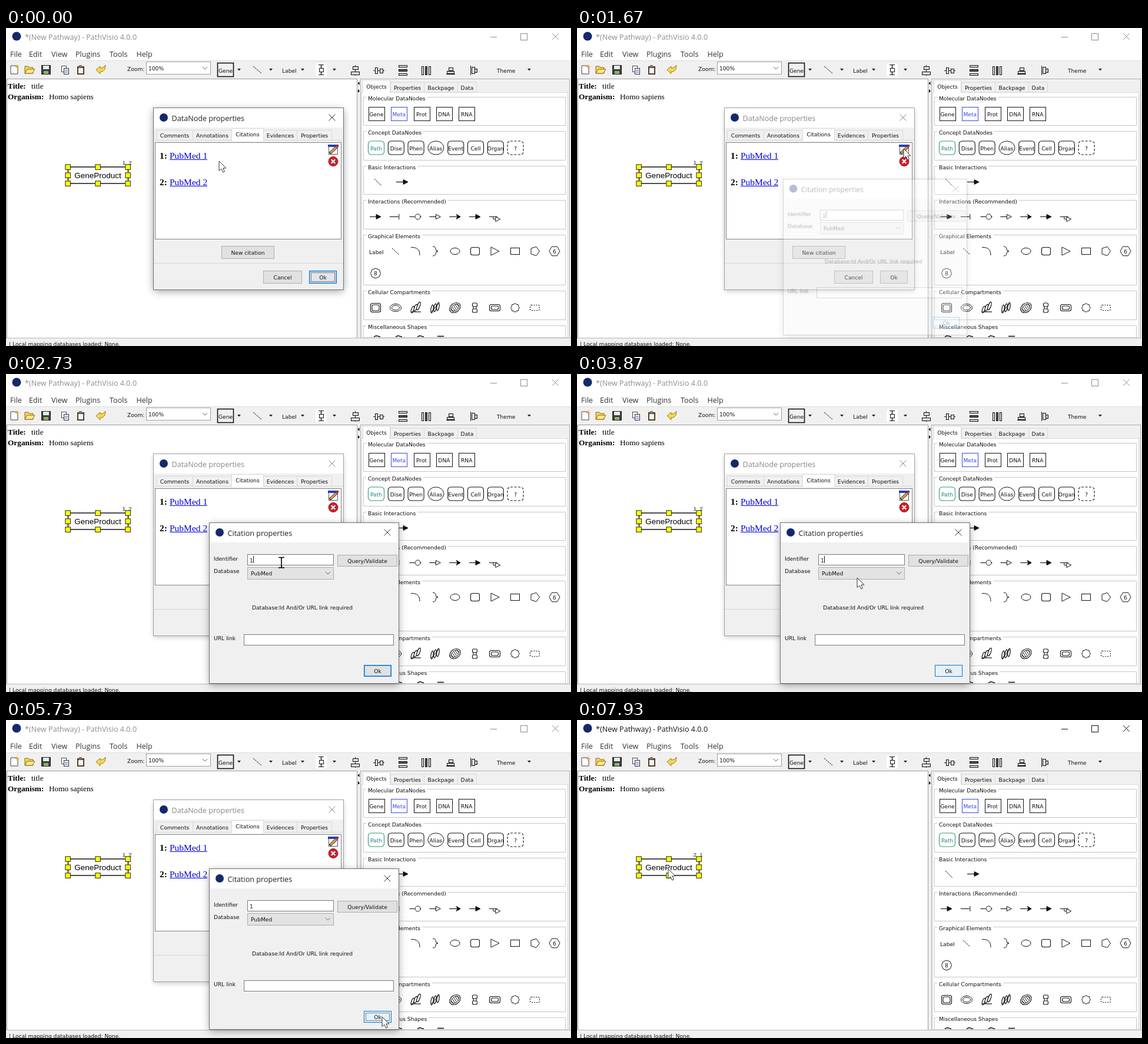
An HTML page with a canvas that plays this animation: 960x540 px, repeating every 8000 ms.

```html
<!DOCTYPE html>
<html lang="en">
<head>
<meta charset="utf-8">
<title>Citation order</title>
<style>
html, body { margin: 0; width: 100%; height: 100%; overflow: hidden; background: #fff; }
canvas { display: block; width: 100vw; height: 100vh; }
</style>
</head>
<body>
<canvas id="stage" width="960" height="540"></canvas>
<script>
const stage = document.getElementById('stage').getContext('2d');
const layer = document.createElement('canvas');
layer.width = 960;
layer.height = 540;
const layerCtx = layer.getContext('2d');
let c = stage;

const LOOP = 8000;
const UI = '9.15px "DejaVu Sans", sans-serif';
const WIN = '12.6px "Open Sans", sans-serif';
const SERIF = '"Liberation Serif", serif';
const GREY = '#f0f0f0', INK = '#111', BLUE = '#0078d7';
const TAU = Math.PI * 2;

// Moments at which the windows change
const CITE_OPEN = 1610, CITE_CLOSE = 5840, PROPS_CLOSE = 6760;

// Pointer stops: time, x, y
const PATH = [
  [0, 362, 226], [350, 362, 226], [1150, 555, 205], [1800, 555, 205],
  [2480, 468, 320], [3130, 468, 320], [3700, 476, 346], [4420, 476, 346],
  [5180, 639, 504], [5860, 639, 504], [6420, 542, 423], [6960, 542, 423],
  [7740, 155, 253], [LOOP, 155, 253]
];

function text(s, x, y, font = UI, color = INK, align = 'left') {
  c.font = font;
  c.fillStyle = color;
  c.textAlign = align;
  c.fillText(s, x, y);
}

function fill(x, y, w, h, color) {
  c.fillStyle = color;
  c.fillRect(x, y, w, h);
}

function box(x, y, w, h, bg, edge = INK, lw = 1) {
  if (bg) fill(x, y, w, h, bg);
  c.strokeStyle = edge;
  c.lineWidth = lw;
  c.strokeRect(x + .5, y + .5, w, h);
}

function trace(pts) {
  c.beginPath();
  for (let i = 0; i < pts.length; i += 2) c.lineTo(pts[i], pts[i + 1]);
}

function paint(bg, edge = INK, lw = 1) {
  if (bg) { c.fillStyle = bg; c.fill(); }
  if (edge) { c.strokeStyle = edge; c.lineWidth = lw; c.stroke(); }
}

function line(pts, color = INK, lw = 1, dash = []) {
  trace(pts);
  c.setLineDash(dash);
  paint(null, color, lw);
  c.setLineDash([]);
}

function poly(pts, bg, edge = INK, lw = 1) {
  trace(pts);
  c.closePath();
  paint(bg, edge, lw);
}

function oval(x, y, rx, ry, bg, edge = INK, lw = 1, turn = 0) {
  c.beginPath();
  c.ellipse(x, y, rx, ry, turn, 0, TAU);
  paint(bg, edge, lw);
}

function round(x, y, w, h, r, bg, edge = INK, lw = 1.1) {
  c.beginPath();
  c.roundRect(x, y, w, h, r);
  paint(bg, edge, lw);
}

function ngon(x, y, r, n, turn = 0, wobble = 0) {
  const pts = [];
  for (let i = 0; i < n; i++) {
    const a = turn + i * TAU / n, d = r - wobble * (i % 2);
    pts.push(x + d * Math.cos(a), y + d * Math.sin(a));
  }
  poly(pts, null);
}

function dotted(x, y, w, h) {
  c.setLineDash([1, 1]);
  box(x, y, w, h, null);
  c.setLineDash([]);
}

function cross(x, y, r, color, lw = 1) {
  line([x - r, y - r, x + r, y + r], color, lw);
  line([x + r, y - r, x - r, y + r], color, lw);
}

function button(label, x, y, w, h, edge = '#adadad', bg = '#e1e1e1') {
  box(x, y, w, h, bg, edge);
  text(label, x + w / 2 + .5, y + h / 2 + 4, UI, INK, 'center');
}

// The default button breathes between grey and pale blue
function okButton(x, y, w, h, t, hot, focus) {
  const p = hot ? 1 : .5 - .5 * Math.cos((t - 2730) / 2280 * TAU);
  const mix = (a, b) => Math.round(a + (b - a) * p);
  button('Ok', x, y, w, h, BLUE, `rgb(${mix(225, 229)},${mix(225, 241)},${mix(225, 251)})`);
  if (!hot) box(x + 1, y + 1, w - 2, h - 2, null, `rgba(0,120,215,${.6 * (1 - p)})`);
  if (focus) dotted(x + 3, y + 3, w - 6, h - 6);
}

function chevron(x, y) {
  line([x - 4, y - 2, x, y + 2, x + 4, y - 2], '#666');
}

function drop(x) {
  poly([x - 3, 69, x + 3, 69, x, 72.5], '#222', null);
}

function head(x, y, bg, open) {
  if (open) poly([x - 7, y - 4, x, y, x - 7, y + 4, x - 5, y], bg);
  else poly([x - 8, y - 4, x, y, x - 8, y + 4], bg);
}

function toolbar() {
  fill(0, 56, 960, 31, GREY);
  line([0, 55.5, 960, 55.5], '#dcdcdc');
  // new, open, save
  poly([8, 64, 17, 64, 20, 67, 20, 78, 8, 78], '#fff', '#444');
  line([19, 62, 19, 69], '#d9a520', 1.4); line([15.5, 65.5, 22.5, 65.5], '#d9a520', 1.4);
  poly([32, 77, 32, 65, 38, 65, 40, 67, 46, 67, 46, 77], '#f4d35e', '#8a6a10');
  poly([32, 77, 36, 70, 49, 70, 45, 77], '#ffe78a', '#8a6a10');
  box(60, 63, 15, 15, '#3b3f3a', '#222');
  fill(63, 64, 10, 6, '#e8eef0'); fill(64, 73, 8, 5, '#8fb06b');
  // copy, paste, undo
  box(94, 64, 8, 10, '#fff', '#445'); box(98, 68, 8, 10, '#e9effa', '#334');
  line([100, 72, 105, 72], '#668'); line([100, 75, 105, 75], '#668');
  box(121, 65, 11, 13, '#6b4a35', '#332'); fill(123, 68, 8, 9, '#f3f3f3'); fill(124, 63, 5, 4, '#777');
  poly([153, 71, 160, 65, 160, 68, 165, 67, 169, 63, 168, 70, 164, 74, 160, 74, 160, 78], '#f7d84b', '#9b7a16');
  text('Zoom:', 206, 73);
  box(238, 57, 109, 21, '#fff', '#a0a0a0');
  text('100%', 242, 72);
  chevron(338, 68);
  box(359, 59, 27, 23, GREY, '#111', 1.6);
  text('Gene', 373, 75.5, UI, INK, 'center');
  [396, 450, 504, 558, 889].forEach(drop);
  line([420, 65, 434, 77], INK, 1, [3, 1]);
  text('Label', 469, 75.5);
  fill(526, 60, 19, 22, '#fff');
  line([531, 62.5, 540, 62.5]); line([531, 79.5, 540, 79.5]); line([535.5, 62, 535.5, 80], INK, 1.4);
  box(532, 68, 7, 6, '#fff');
  // alignment tools
  line([593.5, 63, 593.5, 81]); box(589, 65, 9, 5, '#ddd'); box(586, 74, 14, 5, '#ddd');
  line([624, 72.5, 643, 72.5]); box(627, 67, 4, 10, '#ddd'); box(635, 69, 5, 7, '#ddd');
  for (let i = 0; i < 3; i++) {
    box(667, 63 + i * 7, 14, 3, i == 1 ? '#555' : '#ddd');
    box(706 + i * 6, 65, 3, 14, i == 1 ? '#555' : '#ddd');
  }
  line([748, 78.5, 763, 78.5]); box(752, 67, 7, 5, '#ddd'); box(749, 73, 12, 4, '#ccc');
  line([789.5, 64, 789.5, 80]); box(791, 66, 5, 11, '#ddd'); box(796, 69, 4, 6, '#ccc');
  text('Theme', 834, 75.5);
}

function group(label, top, bottom) {
  line([612, top + .5, 607.5, top + .5, 607.5, bottom + .5, 950.5, bottom + .5, 950.5, top + .5, 614, top + .5], '#c6c6c6');
  c.font = UI;
  fill(613, top - 3, c.measureText(label).width + 5, 10, '#fff');
  text(label, 615, top + 6);
}

function palette() {
  ['Gene', 'Meta', 'Prot', 'DNA', 'RNA'].forEach((s, i) => {
    const x = 616 + i * 38.3, color = i == 1 ? '#3947dd' : INK;
    box(Math.round(x), 134, 27, 23, '#fff', color);
    text(s, x + 13.5, 150, UI, color, 'center');
  });
  ['Path', 'Dise', 'Phen', 'Alias', 'Event', 'Cell', 'Organ', '?'].forEach((s, i) => {
    const x = 629 + i * 33.8, color = i ? INK : '#2f9a70';
    if (i == 3) oval(x, 203.5, 13.5, 11.5, '#fff');
    else {
      if (i == 7) c.setLineDash([4, 2.5]);
      round(x - 13.5, 192, 27, 23, 5, '#fff', color);
      c.setLineDash([]);
    }
    text(s, x, 208, UI, i ? INK : '#247f83', 'center');
  });
  line([626, 256, 638, 268], INK, 1, [3, 1]);
  line([663, 261.5, 676, 261.5], INK, 1.2); head(683, 261.5, INK);

  const mid = i => 628 + i * 33.8;
  for (let i = 0; i < 6; i++) line([mid(i) - 10, 320.5, mid(i) + (i == 2 ? -1 : 5), 320.5], INK, 1.1);
  head(mid(0) + 9, 320.5, INK);
  line([mid(1) + 6, 316, mid(1) + 6, 325]);
  oval(mid(2) + 4, 320.5, 4.5, 4.5, '#fff'); line([mid(2) + 8, 320.5, mid(2) + 10, 320.5]);
  head(mid(3) + 9, 320.5, '#fff');
  head(mid(4) + 9, 320.5, INK, true);
  head(mid(5) + 9, 320.5, INK);
  line([mid(6) - 10, 320.5, mid(6) + 4, 320.5]); line([mid(6) - 3, 320, mid(6) - 3, 324.5, mid(6) + 2, 324.5]);
  head(mid(6) + 9, 324.5, '#fff');

  const y = 379;
  text('Label', 617, 383.5);
  line([656, 374, 668, 385], INK, 1, [3, 1]);
  c.beginPath(); c.moveTo(688, 372.5); c.bezierCurveTo(699, 372, 703, 377, 703, 386); paint(null);
  c.beginPath(); c.moveTo(725, 371); c.quadraticCurveTo(730, 371, 730, 375);
  c.quadraticCurveTo(730, 379, 734, 379); c.quadraticCurveTo(730, 379, 730, 383);
  c.quadraticCurveTo(730, 387, 725, 387); paint(null);
  oval(763, y, 8, 5.5);
  round(789.5, 372.5, 15, 13, 3);
  poly([824, 372, 838, y, 824, 386], null);
  box(857, 373, 15, 11, null);
  ngon(898.5, y, 8, 5);
  ngon(932, y, 9, 6); text('6', 932, 382.5, UI, INK, 'center');
  ngon(628, 416.5, 8.5, 8); text('8', 628, 420, UI, INK, 'center');

  const q = 475;
  round(619.5, 467.5, 17, 15, 3); round(622, 470, 12, 10, 2);
  oval(662, q, 9.5, 6.5); oval(662, q, 6.5, 4);
  for (let i = 0; i < 3; i++) {
    oval(691 + i * 5, 478 - i * 3, 2.2, 6 + (i > 1), '#fff', INK, 1.2, .35);
    oval(724 + i * 5, 477 - i * 2, 2, 7, '#fff', INK, 1.2, .15);
  }
  line([688, 482, 705, 482], INK, 1.2); line([722, 483, 735, 468], INK, 1);
  oval(763, q, 10, 7.5, '#fff', INK, 1.2, -.65); oval(763, q, 7.5, 5, null, INK, 1, -.65);
  for (let i = -2; i < 3; i++) line([761 + i * 2.4, 472 - i * 2, 765 + i * 2.4, 478 - i * 2]);
  round(792.5, 467, 8, 6, 2); round(792.5, 477, 8, 6, 2); line([794, 473, 794, 477]); line([799, 473, 799, 477]);
  round(821.5, 469.5, 18, 11, 3); round(824.5, 472, 12, 6, 2);
  ngon(865, q, 7.5, 16, 0, 1.3);
  c.setLineDash([2, 2]); round(890.5, 470.5, 16, 9, 2); c.setLineDash([]);

  for (let i = 0; i < 3; i++) line([625 + i * 37, 524.5, 629 + i * 37, 522.5, 636 + i * 37, 524.5], INK, 1.4);
  line([733, 523.5, 744, 523.5], INK, 1.6);
}

function tab(label, x, w, y, on) {
  box(x, on ? y - 3 : y, w, on ? 20 : 17, on ? '#fff' : GREY, '#d9d9d9');
  text(label, x + w / 2 + .5, y + (on ? 11 : 13), UI, INK, 'center');
}

function mainWindow(active, order) {
  fill(0, 0, 960, 540, '#fff');
  const tone = active ? '#111' : '#8c8c8c';
  oval(18, 14, 7.5, 7.5, '#14296b', null);
  text('*(New Pathway) - PathVisio 4.0.0', 32, 20, WIN, tone);
  line([823, 15.5, 834, 15.5], tone);
  box(874, 9, 11, 11, null, tone);
  cross(933.5, 14.5, 5.3, tone);
  [['File', 7], ['Edit', 39], ['View', 77], ['Plugins', 118], ['Tools', 176], ['Help', 221.5]]
    .forEach(([s, x]) => text(s, x, 49, WIN, '#333'));
  toolbar();

  box(1, 86, 595, 440, '#fff', '#9a9a9a');
  fill(0, 87, 1, 453, '#d0d0d0');
  const big = '13.3px ' + SERIF;
  text('Title:', 3, 103, 'bold ' + big, '#000');
  text('title', 43, 103, big, '#000');
  text('Organism:', 3, 121, 'bold ' + big, '#000');
  text('Homo sapiens', 73, 121, big, '#000');

  text(order, 213.5, 232, '9.5px "Liberation Sans", sans-serif', '#0c1c50', 'right');
  box(105, 235.5, 102, 28, '#fff', '#000', 1.4);
  text('GeneProduct', 156, 254.5, '13.5px "Liberation Sans", sans-serif', '#000', 'center');
  for (const x of [105, 156, 207]) for (const y of [236, 250, 264])
    if (x != 156 || y != 250) box(x - 4.6, y - 4.6, 8.5, 8.5, '#ff0', '#222');

  fill(597, 87, 363, 453, GREY);
  poly([600.5, 91, 600.5, 97, 597.5, 94], '#000', null);
  poly([598, 104, 598, 110, 601, 107], '#000', null);
  box(602, 86, 355, 440, GREY, '#b0b0b0');
  tab('Properties', 653, 57, 91.5);
  tab('Backpage', 710, 57, 91.5);
  tab('Data', 767, 32, 91.5);
  box(604, 109, 350, 416, '#fff', '#d9d9d9');
  tab('Objects', 606, 46, 91.5, true);
  fill(607, 108, 45, 3, '#fff');
  c.save();
  c.beginPath(); c.rect(603, 88, 353, 437); c.clip();
  group('Molecular DataNodes', 117, 165);
  group('Concept DataNodes', 175, 224);
  group('Basic Interactions', 234, 282);
  group('Interactions (Recommended)', 292, 341);
  group('Graphical Elements', 351, 436);
  group('Cellular Compartments', 446, 495);
  group('Miscellaneous Shapes', 505, 560);
  palette();
  c.restore();

  fill(0, 527, 960, 13, GREY);
  line([0, 526.5, 960, 526.5], '#b8b8b8');
  text('| Local mapping databases loaded: None.', 5, 539.5);
}

function frame(x, y, w, h, title, active) {
  c.save();
  c.shadowColor = `rgba(0,0,0,${active ? .38 : .22})`;
  c.shadowBlur = active ? 13 : 8;
  c.shadowOffsetY = 3;
  fill(x, y, w, h, GREY);
  c.restore();
  box(x - 1, y - 1, w + 1, h + 1, null, active ? '#707070' : '#a0a0a0');
  fill(x, y, w, 33, '#fff');
  oval(x + 17, y + 16, 7, 7, '#14296b', null);
  text(title, x + 30.5, y + 21.5, WIN, active ? '#222' : '#888');
  cross(x + w - 19, y + 16, 5.5, active ? '#333' : '#888');
}

function citation(n, y) {
  const size = '15.5px ' + SERIF;
  text(n + ':', 261, y, 'bold ' + size, '#000');
  text('PubMed ' + n, 278, y, size, '#0000e0');
  line([278, y + 1.5, 342, y + 1.5], '#0000e0');
}

function propsDialog(t, active, swapped, hot) {
  frame(251, 136, 322, 308, 'DataNode properties', active);
  tab('Comments', 255, 62, 173);
  tab('Annotations', 317, 66, 173);
  tab('Evidences', 437, 57, 173);
  tab('Properties', 494, 59, 173);
  line([252, 190.5, 572, 190.5], '#d9d9d9');
  tab('Citations', 383, 54, 173, true);
  fill(384, 189, 53, 3, '#fff');
  if (swapped) dotted(386, 173, 46, 14);
  box(253, 194, 316, 164, '#fff', '#7d838c');
  if (swapped) {
    citation(2, 218);
    citation(1, 258);
  } else {
    citation(1, 222);
    citation(2, 267);
    box(548, 199, 15, 15, '#fff', '#556');
    fill(547, 198, 18, 4, '#2a3fb0');
    line([550, 213, 562, 202], '#333', 4.5);
    line([551, 212, 562, 202], '#e9a23a', 3);
    line([561, 203, 564, 200.5], '#c33', 3);
    oval(556, 226.5, 8, 8, '#cf1f2b', '#9c1720');
    cross(556, 226.5, 3.2, '#fff', 2.2);
  }
  button('New citation', 366, 370, 89, 21);
  line([251, 399.5, 573, 399.5], '#d5d5d5');
  button('Cancel', 437, 412, 65, 21);
  if (active) okButton(515, 412, 46, 21, t, hot, !swapped);
  else button('Ok', 515, 412, 46, 21);
}

function citeDialog(t, hot, caret) {
  frame(346, 253, 321, 272, 'Citation properties', true);
  text('Identifier', 353, 316.5);
  box(410, 306, 146, 18, '#fff', '#7a7a7a');
  text('1', 414, 319.5);
  if (caret) line([420.5, 309, 420.5, 321]);
  button('Query/Validate', 563, 307, 101, 19);
  text('Database', 353, 337.5);
  box(410, 328, 146, 20, '#e3e3e3', '#adadad');
  text('PubMed', 416, 342);
  chevron(547, 338);
  text('Database:Id And/Or URL link required', 418, 400);
  text('URL link', 353, 452);
  box(404, 442, 254, 18, '#fff', '#7a7a7a');
  okButton(608, 494, 46, 19, t, hot, hot);
}

// Windows grow slightly while fading in and shrink while fading out.
// Each is drawn whole on a layer, so that its parts fade as one sheet.
function popup(t, open, close, cx, cy, paintWindow) {
  const k = Math.min(1, (t - open) / 200, 1 - (t - close) / 150);
  if (k <= 0) return;
  if (k == 1) return paintWindow();
  c = layerCtx;
  c.clearRect(0, 0, 960, 540);
  paintWindow();
  c = stage;
  const s = .955 + .045 * k;
  c.save();
  c.globalAlpha = k;
  c.translate(cx, cy);
  c.scale(s, s);
  c.drawImage(layer, -cx, -cy);
  c.restore();
}

function pointer(t) {
  let i = 0;
  while (i < PATH.length - 2 && PATH[i + 1][0] <= t) i++;
  const [t0, x0, y0] = PATH[i], [t1, x1, y1] = PATH[i + 1];
  const k = (t - t0) / (t1 - t0), e = k * k * (3 - 2 * k);
  return [x0 + (x1 - x0) * e, y0 + (y1 - y0) * e];
}

function drawPointer(x, y, beam) {
  if (beam) {
    line([x - 5, y - 8.5, x - 1, y - 8.5, x, y - 7, x + 1, y - 8.5, x + 5, y - 8.5], '#000', 1.4);
    line([x - 5, y + 9, x - 1, y + 9, x, y + 7.5, x + 1, y + 9, x + 5, y + 9], '#000', 1.4);
    line([x, y - 8, x, y + 9], '#000', 1.6);
    return;
  }
  const shape = [0, 0, 0, 16.5, 3.8, 13, 6.6, 19, 9.4, 17.8, 6.8, 12, 12, 12];
  poly(shape.map((v, i) => v + (i % 2 ? y : x)), '#fff', '#333');
}

function draw(t) {
  const [x, y] = pointer(t);
  const inside = (l, top, r, b) => x >= l && x <= r && y >= top && y <= b;
  const citing = t >= CITE_OPEN && t < CITE_CLOSE;
  const swapped = t >= CITE_CLOSE;
  const hot = inside(608, 494, 655, 514);
  const caret = !hot && (t - CITE_OPEN) % 1000 < 520;

  mainWindow(t >= PROPS_CLOSE, swapped ? '2, 1' : '1, 2');
  popup(t, -LOOP, PROPS_CLOSE, 412, 290, () =>
    propsDialog(t, !citing, swapped, inside(515, 412, 562, 434)));
  popup(t, CITE_OPEN, CITE_CLOSE, 506, 389, () => citeDialog(t, hot, caret));
  drawPointer(x, y, citing && t > CITE_OPEN + 200 && inside(411, 306, 556, 326));
}

function tick() {
  draw(performance.now() % LOOP);
  requestAnimationFrame(tick);
}
tick();
</script>
</body>
</html>
```
